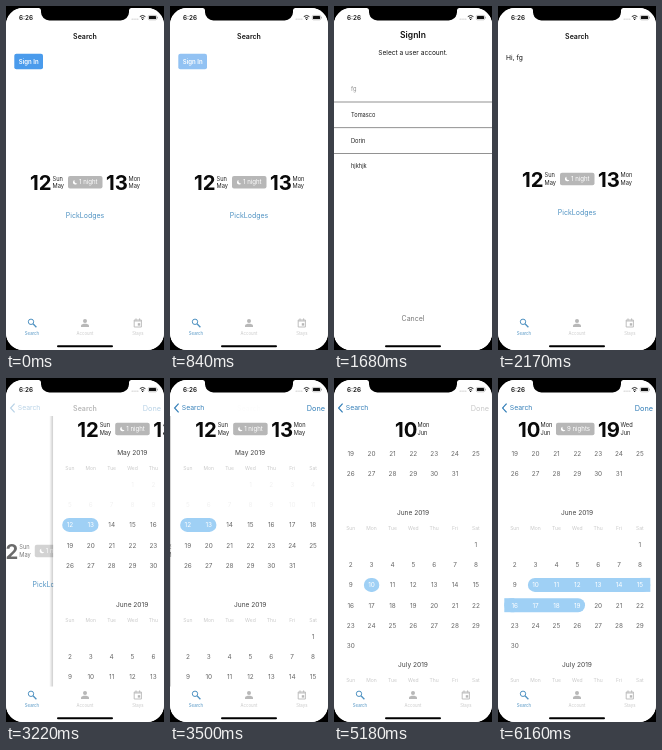
An HTML page for the animation above (8000 ms loop, 158 by 344 pixels).

```html
<!DOCTYPE html>
<html lang="en">
<head>
<meta charset="utf-8">
<title>Hotel date search</title>
<style>
  html, body { margin: 0; width: 100%; height: 100%; overflow: hidden; background: #000; }
  svg { display: block; width: 158px; height: 344px; font-family: Inter, "Liberation Sans", sans-serif; }
</style>
</head>
<body>
<svg id="stage" viewBox="0 0 158 344">
  <defs>
    <clipPath id="screen"><rect y="2" width="158" height="342" rx="17"/></clipPath>
    <clipPath id="list"><rect y="64.5" width="158" height="244"/></clipPath>
    <linearGradient id="edge">
      <stop offset="0" stop-color="#000" stop-opacity="0"/>
      <stop offset="1" stop-color="#000" stop-opacity=".2"/>
    </linearGradient>
  </defs>
</svg>
<script>
const LOOP = 8000, STEP = 70;
const BLUE = '#347fb8', SOFT_BLUE = '#4f92c2', BAND = '#9fd0f5', GREY = '#c9c9c9', ICON = '#b8b8b8';
const COL0 = 6.3, CELL = 20.86, ROW = 20.3, MONTH = 152;

function el(parent, tag, attrs = {}) {
  const node = document.createElementNS('http://www.w3.org/2000/svg', tag);
  for (const key in attrs) node.setAttribute(key, attrs[key]);
  parent.appendChild(node);
  return node;
}
const group = (parent, attrs) => el(parent, 'g', attrs);
const box = (parent, x, y, width, height, fill, rx = 0) =>
  el(parent, 'rect', { x, y, width, height, fill, rx });
const line = (parent, d, stroke, width) =>
  el(parent, 'path', { d, stroke, 'stroke-width': width, fill: 'none' });

// Text whose capitals are centred on cy.
function label(parent, x, cy, text, size, fill = '#111', anchor = 'middle', weight = 400) {
  const node = el(parent, 'text', {
    x, y: cy + size * 0.36, fill, 'font-size': size, 'text-anchor': anchor, 'font-weight': weight
  });
  node.textContent = text;
  return node;
}
const fade = (node, value) => node.setAttribute('opacity', value);
const move = (node, x, y) => node.setAttribute('transform', `translate(${x} ${y})`);

function day(parent, x, cy, [num, name, month]) {
  label(parent, x, cy + 0.6, num, 20.3, '#0a0a0a', 'start', 700);
  label(parent, x + 22.5, cy - 3.8, name, 5.7, '#222', 'start');
  label(parent, x + 22.5, cy + 3.6, month, 5.7, '#222', 'start');
}

function stay(parent, x, cy, from, nights, width, to) {
  const g = group(parent), px = x + 38;
  day(g, x, cy, from);
  if (to) {
    box(g, px, cy - 6.2, width, 12.4, '#b7b7b7', 2);
    el(g, 'path', {
      d: `M${px + 6.6} ${cy - 2.2}a2.3 2.3 0 1 0 2.7 3.2a2.3 2.3 0 0 1 -2.7 -3.2z`, fill: '#fff'
    });
    label(g, px + 11, cy, nights, 6.1, '#fff', 'start');
    day(g, px + width + 3.5, cy, to);
  }
  return g;
}

const svg = document.getElementById('stage');
box(svg, 0, 0, 158, 344, '#000');
const screen = group(svg, { 'clip-path': 'url(#screen)' });
box(screen, 0, 0, 158, 344, '#fff');

// Home
const home = group(screen);
const signIn = group(home);
box(signIn, 8.3, 47.8, 28.7, 15.4, '#4a9bec', 2);
label(signIn, 22.7, 55.6, 'Sign In', 6, '#fff', 'middle', 600);
const hello = label(home, 8, 51.5, 'Hi, fg', 6.7, '#111', 'start');
const middle = group(home);
const MAY12 = ['12', 'Sun', 'May'], MAY13 = ['13', 'Mon', 'May'];
const homeDates = stay(middle, 24, 173, MAY12, '1 night', 34.5, MAY13);
label(middle, 79, 206, 'PickLodges', 7, SOFT_BLUE);

// Calendar
const calendar = group(screen);
box(calendar, -4, 38, 4, 271, 'url(#edge)');
box(calendar, 0, 38, 158, 271, '#fff');
const stays = [
  stay(calendar, 24, 51, MAY12, '1 night', 34.5, MAY13),
  stay(calendar, 61, 51, ['10', 'Mon', 'Jun']),
  stay(calendar, 20, 51, ['10', 'Mon', 'Jun'], '9 nights', 38.5, ['19', 'Wed', 'Jun'])
];
const list = group(group(calendar, { 'clip-path': 'url(#list)' }));
const bands = [group(list), group(list), group(list)];
const months = [['May 2019', 3, 31], ['June 2019', 6, 30], ['July 2019', 1, 31]];
const ranges = [[0, 12, 13], [1, 10, 10], [1, 10, 19]];
const days = [];
const rowY = (m, row) => 74.5 + m * MONTH + 31.8 + row * ROW;

months.forEach(([title, first, count], m) => {
  const top = 74.5 + m * MONTH;
  label(list, 79, top, title, 6.6, '#444');
  ['Sun', 'Mon', 'Tue', 'Wed', 'Thu', 'Fri', 'Sat'].forEach((name, c) =>
    label(list, COL0 + CELL * (c + 0.5), top + 15.2, name, 5, GREY));
  for (let d = 1; d <= count; d++) {
    const cell = first + d - 1;
    const node = label(list, COL0 + CELL * (cell % 7 + 0.5), rowY(m, Math.floor(cell / 7)), d, 6.4);
    days.push({ node, m, d });
  }
});

ranges.forEach(([m, from, to], i) => {
  const a = months[m][1] + from - 1, b = months[m][1] + to - 1;
  for (let row = Math.floor(a / 7); row <= Math.floor(b / 7); row++) {
    const start = Math.max(a, row * 7), end = Math.min(b, row * 7 + 6);
    const left = COL0 + (start - row * 7) * CELL + (start === a ? 2.7 : 0);
    const right = COL0 + (end - row * 7 + 1) * CELL - (end === b ? 2.7 : 0);
    const y = rowY(m, row) - 7;
    box(bands[i], left, y, right - left, 14, BAND, 7);
    if (start !== a) box(bands[i], left, y, 10, 14, BAND);
    if (end !== b) box(bands[i], right - 10, y, 10, 14, BAND);
  }
});
const thumb = box(calendar, 155, 65, 1.6, 16, '#999', 0.8);

// Navigation bar
const nav = group(screen);
box(nav, 0, 0, 158, 38, '#fff');
const title = label(nav, 79, 30, 'Search', 7, '#111', 'middle', 600);
const back = group(nav);
line(back, 'M8.6 25.6L4.6 30L8.6 34.4', BLUE, 1.2);
label(back, 11.8, 30, 'Search', 6.8, BLUE, 'start');
const done = label(nav, 155, 30, 'Done', 7.3, BLUE, 'end');

// Tab bar
const tabs = group(screen);
box(tabs, 0, 308.5, 158, 36, '#fff');
el(tabs, 'circle', { cx: 25, cy: 315.8, r: 2.7, fill: 'none', stroke: SOFT_BLUE, 'stroke-width': 1 });
line(tabs, 'M27 317.8L30.4 321.2', SOFT_BLUE, 1.3);
el(tabs, 'circle', { cx: 79, cy: 315, r: 2, fill: ICON });
el(tabs, 'path', { d: 'M75 321v-1.2c0-1.4 2.4-2 4-2s4 .6 4 2v1.2z', fill: ICON });
line(tabs, 'M128.2 314h7.2v7h-7.2zM128.2 315h7.2M130 312.4v2M133.6 312.4v2', ICON, 0.9);
box(tabs, 131.8, 317.2, 2.4, 2.4, ICON);
label(tabs, 26, 327.3, 'Search', 4.3, SOFT_BLUE);
label(tabs, 79, 327.3, 'Account', 4.3, GREY);
label(tabs, 131.8, 327.3, 'Stays', 4.3, GREY);

// Account picker
const sheet = group(screen);
box(sheet, 0, 10, 158, 336, '#fff');
label(sheet, 79, 28.7, 'SignIn', 8.5, '#111', 'middle', 600);
label(sheet, 79, 46.2, 'Select a user account.', 6.6);
const users = ['fg', 'Tomasco', 'Dorin', 'hjkhjk'].map((name, i) => {
  if (i) box(sheet, 0, 69.9 + i * 25.7, 158, 0.8, '#777');
  return label(sheet, 17, 83.2 + i * 25.7, name, 5.7, '#222', 'start');
});
label(sheet, 79, 312.5, 'Cancel', 7, '#777');

// Status bar and bezel
const status = group(screen);
label(status, 20, 11.8, '6:26', 6.3, '#111', 'middle', 600);
for (let i = 0; i < 4; i++) box(status, 125.6 + i * 1.9, 12.6, 1.1, 1.1, '#bbb', 0.4);
line(status, 'M133.8 10.6a4.4 4.4 0 0 1 5.6 0M135 12.2a2.6 2.6 0 0 1 3.2 0', '#111', 0.9);
el(status, 'circle', { cx: 136.6, cy: 13.4, r: 0.7, fill: '#111' });
el(status, 'rect', { x: 142.3, y: 9.4, width: 8.4, height: 4.4, rx: 1.2, fill: 'none', stroke: '#888', 'stroke-width': 0.5 });
box(status, 143, 10.1, 7, 3, '#111', 0.6);
box(status, 151.2, 10.8, 0.6, 1.6, '#888');
box(status, 51, 339.2, 56, 2.1, '#000', 1);
el(svg, 'path', { d: 'M32 0V2A2.5 2.5 0 0 1 35 4.5V6.2A8.4 8.4 0 0 0 43.4 14.5H114.6A8.4 8.4 0 0 0 123 6.2V4.5A2.5 2.5 0 0 1 126 2V0Z' });

// Critically damped spring, 0 to 1.
function spring(t, start, omega) {
  const x = Math.max(0, t - start) / 1000 * omega;
  return 1 - (1 + x) * Math.exp(-x);
}

function track(t, points) {
  let [t0, v0] = points[0];
  if (t <= t0) return v0;
  for (const [t1, v1] of points) {
    if (t < t1) return v0 + (v1 - v0) * (t - t0) / (t1 - t0);
    [t0, v0] = [t1, v1];
  }
  return v0;
}

const SCROLL = [[3710, 0], [3780, 6], [3850, 27], [3920, 57], [3990, 82],
  [4060, 94], [4130, 94.5], [4200, 93], [4270, 92]];

function select(phase) {
  const [month, from, to] = ranges[phase];
  stays.forEach((g, i) => fade(g, i === phase ? 1 : 0));
  bands.forEach((g, i) => fade(g, i === phase ? 1 : 0));
  for (const { node, m, d } of days) {
    const chosen = m === month && d >= from && d <= to;
    const past = m === 0 && d < 12;
    node.setAttribute('fill', chosen ? '#fff' : past ? '#f1f1f1' : '#666');
  }
  done.setAttribute('fill', phase === 1 ? GREY : BLUE);
}

let shown = -1;
function render(t) {
  const signedIn = t >= 1890;
  fade(signIn, signedIn ? 0 : t >= 700 ? 0.6 : 1);
  fade(hello, signedIn ? 1 : 0);
  move(middle, 0, signedIn ? 0 : 3.3);
  fade(homeDates, t >= 2590 ? 0.6 : 1);

  move(sheet, 0, 344 * (1 - spring(t, 832, 18.26) + spring(t, 1880, 18.26)));
  fade(users[0], t >= 1680 ? 0.5 : 1);

  const push = t >= 3700 ? 1 : spring(t, 3070, 16.3);
  move(home, -47.4 * push, 0);
  move(calendar, 158 * (1 - push) + (push ? 0 : 10), 0);
  fade(title, 1 - push);
  fade(back, push ** 3);
  fade(done, push ** 3);

  const y = track(t, SCROLL);
  move(list, 0, -y);
  move(thumb, 0, y * 2 / 94);
  fade(thumb, t < 3780 || t >= 4480 ? 0 : t >= 4410 ? 0.4 : 1);

  const phase = t >= 6160 ? 2 : t >= 5180 ? 1 : 0;
  if (phase !== shown) select(shown = phase);
}

// The picture advances on a fixed beat; the small lead absorbs timer jitter.
const begin = performance.now();
function tick() {
  const t = (performance.now() - begin + 12) % LOOP;
  render(Math.floor(t / STEP) * STEP);
  requestAnimationFrame(tick);
}
tick();
</script>
</body>
</html>
```
